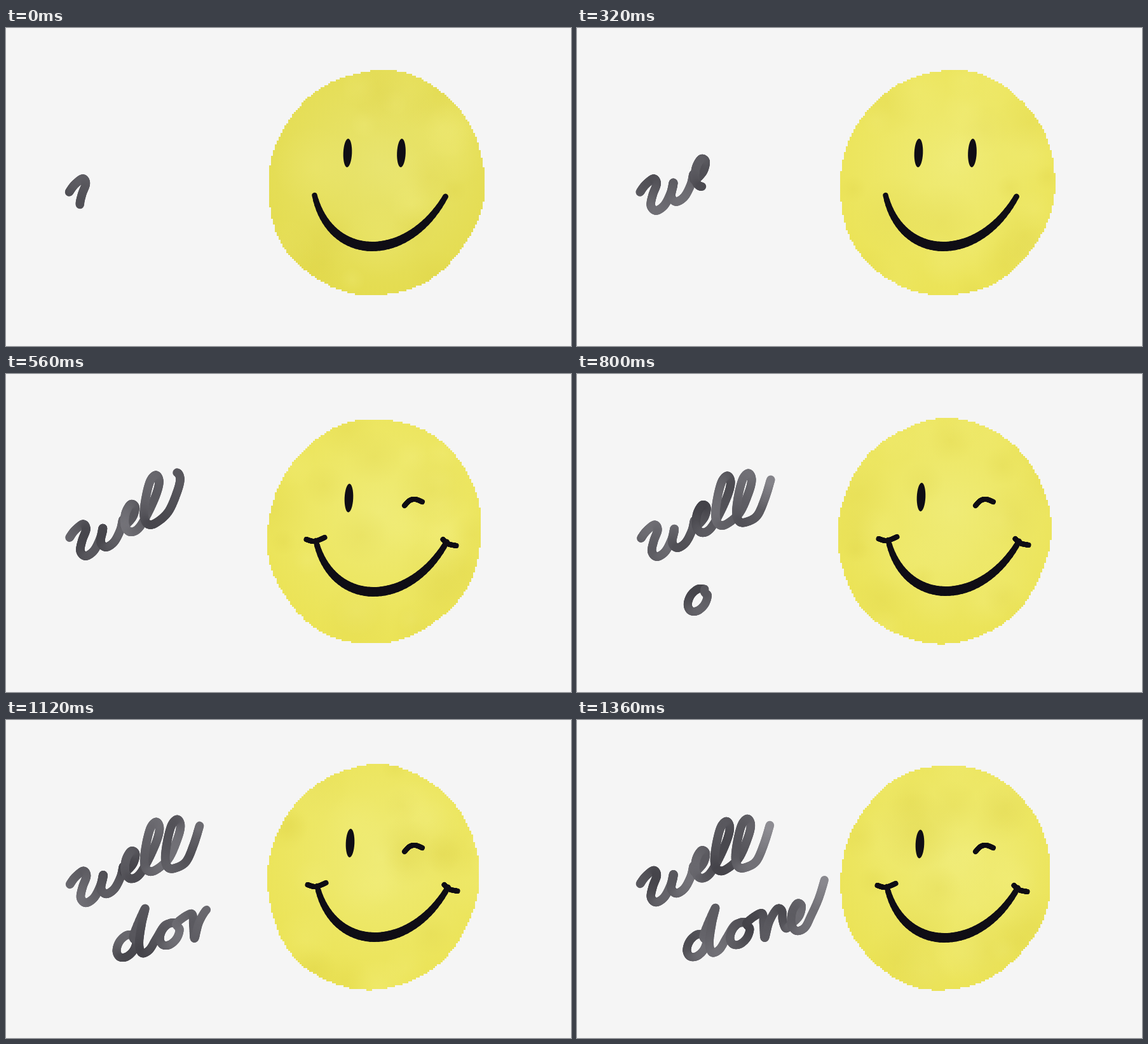
Animation of 889x500 px, one loop 1.44 s. Source, as an HTML page with a canvas:

```html
<!DOCTYPE html>
<html lang="en">
<head>
<meta charset="utf-8">
<title>Well done</title>
<style>
html, body { margin: 0; width: 100%; height: 100%; overflow: hidden; background: #f5f5f5; }
canvas { display: block; }
</style>
</head>
<body>
<canvas id="stage" width="889" height="500"></canvas>
<script>
const ctx = document.getElementById('stage').getContext('2d');
const STEP = 80, STEPS = 18, WINK_FROM = 6, INK = '#0f0d15';
const { sin, cos, PI, floor, min, max, round } = Math;

const mix = (a, b, t) => a + (b - a) * t;

function randomFrom(seed) {
  return () => {
    seed = (seed * 16807) % 2147483647;
    return seed / 2147483647;
  };
}

// Letter parts, drawn around a given origin.
const part = text => {
  const pts = text.split(' ').map(p => p.split(',').map(Number));
  return (x, y) => pts.map(([dx, dy]) => [x + dx, y + dy]);
};
const hook = part('0,0 8,-11 21,-21 26,-13');
const dip = part('0,0 -3,17 5,25 18,17 28,-2 32,-18');
const smallLoop = part('0,-9 13,-22 17,-38 10,-42 2,-28 1,-9 9,1 22,-4');
const tallLoop = part('17,-18 31,-49 36,-70 31,-80 22,-71 15,-45 12,-18 17,-4 29,-4');
const stem = part('0,0 -5,24 -9,54 -5,70 7,65 18,47 32,26');
const arch = part('0,0 3,18 5,39 12,14 24,-6 32,-4 33,11 38,24');
const tail = part('0,0 12,-27 21,-56');
const bowl = (x, y) => Array.from({ length: 9 }, (_, i) => {
  const a = i * PI / 4;
  return [x + 11 * (cos(a) - sin(a)), y - 17 * cos(a) - 7 * sin(a)];
});

const WELL = [hook(100, 258), dip(120, 262), dip(152, 248), smallLoop(186, 248),
  tallLoop(205, 240), tallLoop(238, 236), tail(283, 222)].flat();
const DONE = [bowl(189, 355), stem(218, 296), bowl(257, 336), arch(291, 304),
  smallLoop(337, 331), tail(369, 308)].flat();
const TOTAL = WELL.length + DONE.length - 1;

// Pen progress along both words, as [step, point].
const PEN = [[0, 4.9], [4, 22.2], [7, 36], [10, 53], [12, 61], [14, 74], [17, TOTAL]];

function penAt(step) {
  const i = max(1, PEN.findIndex(([at]) => at >= step));
  const [[s0, p0], [s1, p1]] = [PEN[i - 1], PEN[i]];
  return mix(p0, p1, (step - s0) / (s1 - s0));
}

const cubic = (a, b, c, d, t) => 0.5 * (2 * b + (c - a) * t +
  (2 * a - 5 * b + 4 * c - d) * t * t + (3 * b - a - 3 * c + d) * t * t * t);

function along(pts, u) {
  const last = pts.length - 1, i = min(floor(u), last - 1);
  const p = j => pts[max(0, min(last, j))];
  return [0, 1].map(n => cubic(p(i - 1)[n], p(i)[n], p(i + 1)[n], p(i + 2)[n], u - i));
}

function bezier(a, b, c, d, t) {
  const s = 1 - t;
  return [0, 1].map(n =>
    s * s * s * a[n] + 3 * s * s * t * b[n] + 3 * s * t * t * c[n] + t * t * t * d[n]);
}

// Brush stroke whose width and colour depend on the position u.
function brush(curve, end, width, color) {
  ctx.lineCap = 'round';
  const count = max(40, Math.ceil(end * 8));
  for (let i = 0; i < count; i++) {
    const u = end * i / count;
    ctx.lineWidth = width(u);
    ctx.strokeStyle = color(u);
    ctx.beginPath();
    ctx.moveTo(...curve(u));
    ctx.lineTo(...curve(end * (i + 1) / count));
    ctx.stroke();
  }
}

const inkLine = pts => brush(u => along(pts, u), pts.length - 1, () => 8, () => INK);

// A slightly lopsided oval; its rim is stepped like coarse cut paper.
function facePath(step, sway, random) {
  const cx = 580 + 2.5 * sway, cy = step < WINK_FROM ? 244 : 248;
  const rx = 170.5 - 0.28 * step, ry = 177;
  const phases = [3, 5, 8].map(n => [n, random() * 2 * PI]);
  const snap = v => round(v / 3) * 3;
  let lastY = null;
  ctx.beginPath();
  for (let i = 0; i < 720; i++) {
    const a = i * PI / 360;
    const bump = 1 - 0.014 * sin(2 * a) +
      phases.reduce((sum, [n, p]) => sum + 0.004 * sin(n * a + p), 0);
    const x = snap(cx + rx * bump * cos(a)), y = snap(cy + ry * bump * sin(a));
    if (lastY !== null) ctx.lineTo(x, lastY);
    ctx.lineTo(x, y);
    lastY = y;
  }
  ctx.closePath();
}

function softDisc(x, y, r, inner, outer) {
  const g = ctx.createRadialGradient(x, y, 0, x, y, r);
  g.addColorStop(0, inner);
  g.addColorStop(1, outer);
  ctx.fillStyle = g;
  ctx.fillRect(400, 55, 365, 385);
}

function drawPaint(step, sway, random) {
  ctx.save();
  facePath(step, sway, random);
  ctx.clip();
  const fresh = min(1, step / 4);
  const tone = (r, g, b) => `rgb(${[r, g, b].map(v => round(v - 7 * (1 - fresh)))})`;
  softDisc(590, 215, 210, tone(239, 235, 118), tone(235, 227, 86));
  for (let i = 0; i < 30; i++) {
    const x = 410 + random() * 345, y = 65 + random() * 360, r = 20 + random() * 45;
    const rgb = i % 2 ? '218,206,66' : '245,241,135';
    softDisc(x, y, r, `rgba(${rgb},0.2)`, `rgba(${rgb},0)`);
  }
  ctx.restore();
}

function drawEye(x, y) {
  ctx.fillStyle = INK;
  ctx.beginPath();
  ctx.ellipse(x, y, 6.8, 22.5, 0.04, 0, 2 * PI);
  ctx.fill();
}

function drawFeatures(step, sway) {
  const eyeX = 539.5 - 2 * sway, eyeY = 195 + 1.5 * sway;
  const left = [487.5 - 2 * sway, 262 + sway], right = [left[0] + 206, left[1] + 2];
  const low = [[left[0] + 25, left[1] + 106], [right[0] - 60, right[1] + 106]];
  drawEye(eyeX, eyeY);
  if (step < WINK_FROM) {
    drawEye(eyeX + 84.5, eyeY);
  } else {
    inkLine(part('-14,6 -6,-2 3,-4 14,0')(641, 201));
    inkLine(part('-15,-2 -2,1 14,-5')(...left));
    inkLine(part('-6,-4 2,3 15,6')(...right));
  }
  brush(t => bezier(left, ...low, right, t), 1, t => 8.5 + 6.5 * sin(t * PI), () => INK);
}

// Diluted ink: its grey drifts along the line and fades at the last stroke.
function drawWord(pts, pen, width, random) {
  if (pen <= 0) return;
  const p = random() * 2 * PI, q = random() * 2 * PI, last = pts.length - 1;
  const ink = u => {
    const fade = max(0, u - last + 1.5) * 28;
    const v = round(91 + 13 * sin(u * 0.22 + p) + 11 * sin(u * 0.9 + q) + fade);
    return `rgb(${v},${v - 1},${v + 5})`;
  };
  brush(u => along(pts, u), min(pen, last), () => width, ink);
}

function draw(step) {
  const random = randomFrom(step * 977 + 131), sway = cos(step * PI / 2);
  const pen = penAt(step);
  ctx.fillStyle = '#f5f5f5';
  ctx.fillRect(0, 0, 889, 500);
  drawPaint(step, sway, random);
  drawFeatures(step, sway);
  ctx.save();
  ctx.translate(random() * 2 - 1, random() * 2 - 1);
  drawWord(WELL, pen, 13.5, random);
  drawWord(DONE, pen - WELL.length, 13, random);
  ctx.restore();
}

let shown = -1;
function tick() {
  const step = floor(performance.now() / STEP) % STEPS;
  if (step !== shown) draw(shown = step);
  requestAnimationFrame(tick);
}
tick();
</script>
</body>
</html>
```
